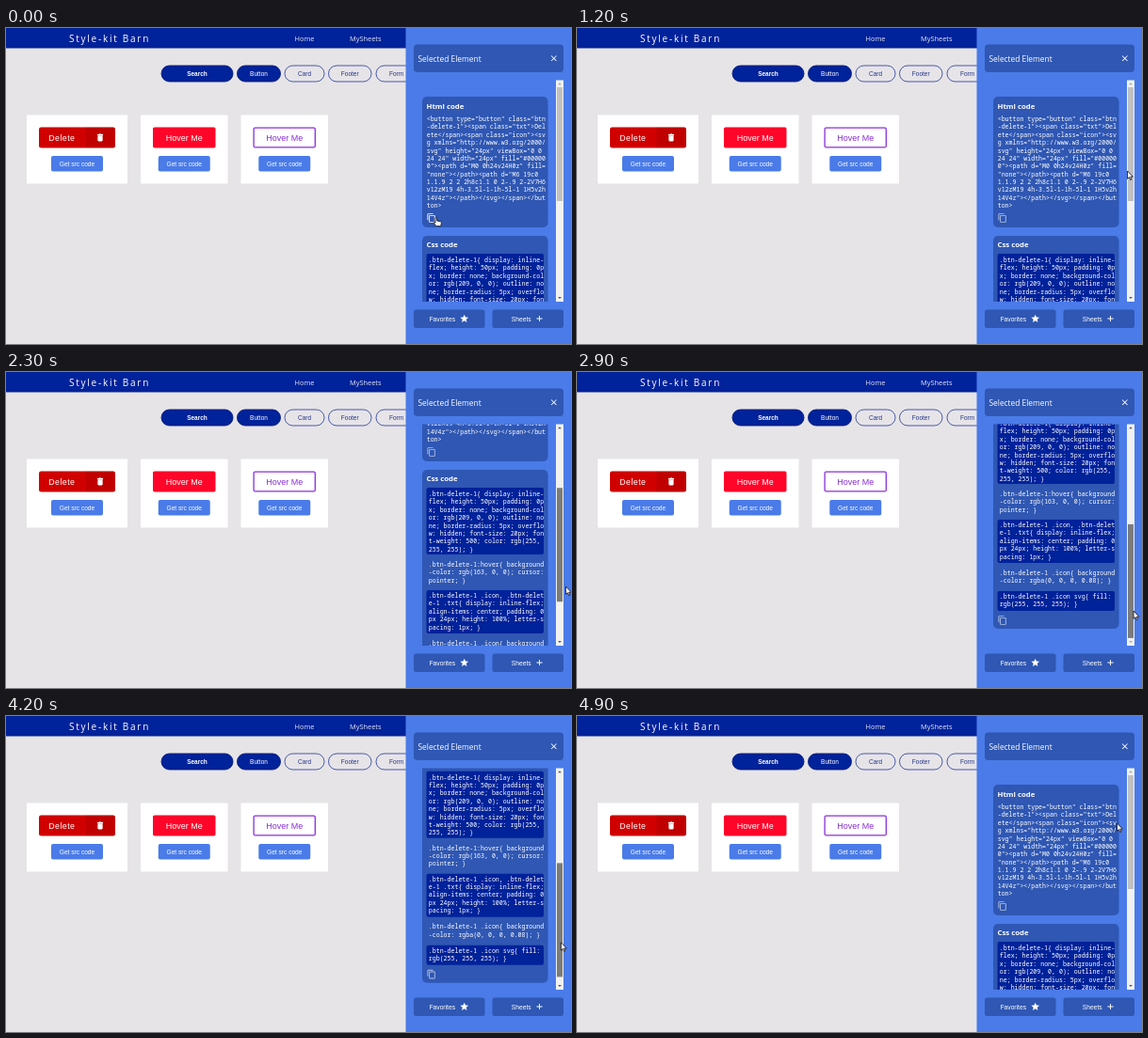
An HTML page with a canvas for the animation above (5000 ms loop, 600 by 336 pixels).

```html
<!DOCTYPE html>
<html lang="en">
<head>
<meta charset="utf-8">
<title>Component gallery</title>
<style>
html, body { margin: 0; width: 100%; height: 100%; overflow: hidden; background: #e6e4e7; }
canvas { display: block; width: 600px; height: 336px; }
</style>
</head>
<body>
<canvas id="stage"></canvas>
<script>
const W = 600, H = 336, LOOP = 5000, STEP = 100;
const canvas = document.getElementById('stage');
const ctx = canvas.getContext('2d');
const ratio = window.devicePixelRatio || 1;
canvas.width = W * ratio;
canvas.height = H * ratio;

const NAVY = '#00229a', BLUE = '#4a7be8', CARD = '#2f57b3', PURPLE = '#8a2fd6';
const UI = '"Open Sans", "Noto Sans", sans-serif';
const ARIAL = '"Liberation Sans", Arial, sans-serif';
const MONO = '500 6.58px "Noto Sans Mono", "DejaVu Sans Mono", monospace';
const LINE = 8.36;

const HTML_LINES = [
  '<button type="button" class="btn',
  '-delete-1"><span class="txt">Del',
  'ete</span><span class="icon"><sv',
  'g xmlns="http://www.w3.org/2000/',
  'svg" height="24px" viewBox="0 0',
  '24 24" width="24px" fill="#00000',
  '0"><path d="M0 0h24v24H0z" fill=',
  '"none"></path><path d="M6 19c0',
  '1.1.9 2 2 2h8c1.1 0 2-.9 2-2V7H6',
  'v12zM19 4h-3.5l-1-1h-5l-1 1H5v2h',
  '14V4z"></path></svg></span></but',
  'ton>'
];

// Rules of the style sheet: first line centre, dark block span (if any), lines
const RULES = [
  { y: 247, box: [240, 311], lines: [
    '.btn-delete-1{ display: inline-',
    'flex; height: 50px; padding: 0p',
    'x; border: none; background-col',
    'or: rgb(209, 0, 0); outline: no',
    'ne; border-radius: 5px; overflo',
    'w: hidden; font-size: 20px; fon',
    't-weight: 500; color: rgb(255,',
    '255, 255); }'] },
  { y: 322, lines: [
    '.btn-delete-1:hover{ background',
    '-color: rgb(163, 0, 0); cursor:',
    'pointer; }'] },
  { y: 355, box: [349, 395], lines: [
    '.btn-delete-1 .icon, .btn-delet',
    'e-1 .txt{ display: inline-flex;',
    'align-items: center; padding: 0',
    'px 24px; height: 100%; letter-s',
    'pacing: 1px; }'] },
  { y: 405.5, lines: [
    '.btn-delete-1 .icon{ background',
    '-color: rgba(0, 0, 0, 0.08); }'] },
  { y: 431, box: [425, 446], lines: [
    '.btn-delete-1 .icon svg{ fill:',
    'rgb(255, 255, 255); }'] }
];

// Keys: time, value(s)
const SCROLL = [[0, 0], [1400, 0], [1700, 28], [2300, 117], [2700, 180], [2900, 192],
  [4000, 192], [4300, 176], [4500, 145], [4700, 40], [4800, 0]];
const POINTER = [[0, 454, 201], [100, 456, 200], [500, 580, 160], [700, 586, 154],
  [1200, 584.5, 152], [1400, 585, 155], [1800, 585, 183], [2300, 594.5, 228], [2600, 594, 246],
  [2900, 591, 254], [3600, 589.5, 258], [4000, 589, 256], [4500, 590, 218],
  [4700, 589, 160], [4800, 582, 138], [4900, 573.5, 114]];

const PLUS = new Path2D('M19 13h-6v6h-2v-6H5v-2h6V5h2v6h6z');
const CLOSE = new Path2D('M19 6.4 17.6 5 12 10.6 6.4 5 5 6.4 10.6 12 5 17.6 6.4 19 12 13.4 17.6 19 19 17.6 13.4 12z');
const STAR = new Path2D('M12 17.3 18.2 21l-1.7-7L22 9.2l-7.2-.6L12 2 9.2 8.6 2 9.2 7.5 14l-1.7 7z');
const BIN = new Path2D('M6 19c0 1.1.9 2 2 2h8c1.1 0 2-.9 2-2V7H6v12zM19 4h-3.5l-1-1h-5l-1 1H5v2h14z');
const COPY = new Path2D('M16 1H4C2.9 1 2 1.9 2 3v14h2V3h12zM19 5H8C6.9 5 6 5.9 6 7v14c0 1.1.9 2 2 2h11c1.1 0 2-.9 2-2V7c0-1.1-.9-2-2-2zM19 21H8V7h11z');
const ARROW = new Path2D('M0 0V8.4L1.9 6.7 3.2 9.6 4.5 9 3.2 6.2H5.9Z');
const HAND = new Path2D('M2 1Q2.9 0 3.7 1V4L7.4 4.8Q8.5 5.1 8.4 6.2L7.7 9.7H3.1L.4 6.7Q-.1 5.8.8 5.5L2 6.2Z');

function track(keys, t) {
  let i = 0;
  while (i < keys.length - 2 && t >= keys[i + 1][0]) i++;
  const a = keys[i], b = keys[i + 1];
  const k = Math.min(1, (t - a[0]) / (b[0] - a[0]));
  return a.slice(1).map((v, n) => v + (b[n + 1] - v) * k);
}

function rect(x, y, w, h, fill, r = 0, stroke, width = 1) {
  ctx.beginPath();
  ctx.roundRect(x, y, w, h, r);
  if (fill) { ctx.fillStyle = fill; ctx.fill(); }
  if (stroke) { ctx.strokeStyle = stroke; ctx.lineWidth = width; ctx.stroke(); }
}

// y is the baseline
function text(str, x, y, font, color = '#fff', align = 'left', spacing = 0) {
  ctx.font = font;
  ctx.fillStyle = color;
  ctx.textAlign = align;
  ctx.letterSpacing = spacing + 'px';
  ctx.fillText(str, x, y);
}

// 24-unit icon centred on a point
function icon(path, cx, cy, size, color) {
  ctx.save();
  ctx.translate(cx - size / 2, cy - size / 2);
  ctx.scale(size / 24, size / 24);
  ctx.fillStyle = color;
  ctx.fill(path, 'evenodd');
  ctx.restore();
}

function code(lines, x, y) {
  lines.forEach((s, i) => text(s, x, y + 2.1 + i * LINE, MONO));
}

function pill(label, x, w, filled, bold) {
  rect(x, 40, w, 17, filled && NAVY, 8.5, filled ? '#001a78' : '#34489c', 0.9);
  text(label, x + w / 2, 50.8, (bold ? 'bold ' : '') + '6.5px ' + ARIAL, filled ? '#fff' : '#26368a', 'center');
}

function drawPage() {
  rect(0, 0, W, H, '#e6e4e7');
  rect(0, 0, 425, 21.5, NAVY);
  text('Style-kit Barn', 67, 15.2, '10px ' + UI, '#fff', 'left', 1.75);
  text('Home', 306.5, 14, '7.4px ' + UI, '#e4e8f8');
  text('MySheets', 365, 14, '7.4px ' + UI, '#e4e8f8');

  pill('Search', 165, 76, true, true);
  pill('Button', 245.5, 46, true);
  pill('Card', 296, 42, false);
  pill('Footer', 342.5, 45.5, false);
  pill('Form', 393, 43, false);

  [[22, 107], [143, 92.5], [249.5, 92.5]].forEach(([x, w]) => {
    rect(x, 92.5, w, 73, '#fff');
    const mid = x + w / 2;
    rect(mid - 27.5, 136, 55, 16.5, BLUE, 2);
    text('Get src code', mid, 146.6, '6.6px ' + ARIAL, '#fff', 'center');
  });

  rect(35, 105.5, 81, 22, '#d10000', 2.2);
  rect(84.3, 105.5, 31.7, 22, 'rgba(0,0,0,.08)', [0, 2.2, 2.2, 0]);
  text('Delete', 45.3, 119.6, '8.8px ' + ARIAL, '#fff', 'left', 0.45);
  icon(BIN, 100, 116.5, 10.5, '#fff');

  rect(156, 105.5, 66.5, 22, '#ff0529', 1.8);
  text('Hover Me', 189.2, 119.6, '9px ' + ARIAL, '#fff', 'center');
  rect(263.1, 106.1, 65.2, 20.8, '#fff', 1.5, PURPLE, 1.3);
  text('Hover Me', 295.7, 119.6, '9px ' + ARIAL, PURPLE, 'center');
}

function drawList(scroll, hover) {
  ctx.save();
  ctx.beginPath();
  ctx.rect(433, 55.5, 159, 235.5);
  ctx.clip();
  ctx.translate(0, -scroll);

  rect(442, 73, 133.5, 139, CARD, 5);
  text('Html code', 446.5, 86, 'bold 7.8px ' + UI);
  code(HTML_LINES, 446.7, 97);
  icon(COPY, 451.8, 202, 10.5, hover ? '#fff' : '#b4c3e6');

  rect(442, 221, 133.5, 244, CARD, 5);
  text('Css code', 446.5, 233.3, 'bold 7.8px ' + UI);
  RULES.forEach(({ y, box, lines }) => {
    if (box) rect(446.5, box[0], 124.5, box[1] - box[0], NAVY, 2);
    code(lines, 448.8, y);
  });
  icon(COPY, 451.8, 456, 10.5, '#b4c3e6');
  ctx.restore();
}

function triangle(cx, cy, dir, color) {
  ctx.beginPath();
  ctx.moveTo(cx - 1.8, cy + dir);
  ctx.lineTo(cx + 1.8, cy + dir);
  ctx.lineTo(cx, cy - dir);
  ctx.fillStyle = color;
  ctx.fill();
}

function drawScrollbar(scroll, t) {
  const dragging = (t >= 1400 && t < 3200) || (t >= 3900 && t < 4800);
  const over = t >= 500 && t < 4800;
  const color = dragging ? '#7c7c7c' : over && t > 3000 ? '#a8a8a8' : '#c1c1c1';
  rect(584, 55.5, 8, 235.5, '#f1f1f1');
  rect(585, 63 + scroll * 0.515, 6, 121, color);
  triangle(588, 59.3, 1, scroll > 0 ? '#505050' : '#a3a3a3');
  triangle(588, 287, -1, scroll < 192 ? '#505050' : '#a3a3a3');
}

function drawPanel(scroll, t) {
  rect(424.5, 0, 175.5, H, BLUE);
  rect(433, 17.5, 159, 29.5, CARD, 4);
  text('Selected Element', 437.5, 36, '8.4px ' + UI);
  icon(CLOSE, 581.8, 32.3, 10.5, '#fff');
  drawList(scroll, t < 200);
  drawScrollbar(scroll, t);

  rect(433, 299.5, 75.5, 19.5, CARD, 2.5);
  rect(516.5, 299.5, 75.5, 19.5, CARD, 2.5);
  text('Favorites', 449.5, 311.6, '6.7px ' + ARIAL);
  text('Sheets', 536.8, 311.6, '6.7px ' + ARIAL);
  icon(STAR, 486.7, 309, 10.5, '#fff');
  icon(PLUS, 566.5, 309, 10.5, '#fff');
}

function drawPointer(t) {
  const [x, y] = track(POINTER, t);
  const shape = t < 200 ? HAND : ARROW;
  ctx.save();
  ctx.translate(x, y);
  ctx.lineWidth = 0.9;
  ctx.lineJoin = 'round';
  ctx.fillStyle = '#fff';
  ctx.strokeStyle = '#1c1c28';
  ctx.fill(shape);
  ctx.stroke(shape);
  ctx.restore();
}

function draw(time) {
  const t = Math.floor((time % LOOP) / STEP) * STEP;
  const [scroll] = track(SCROLL, t);
  ctx.setTransform(ratio, 0, 0, ratio, 0, 0);
  drawPage();
  drawPanel(scroll, t);
  drawPointer(t);
}

const start = performance.now();
function frame() {
  draw(performance.now() - start);
  requestAnimationFrame(frame);
}
frame();
</script>
</body>
</html>
```
